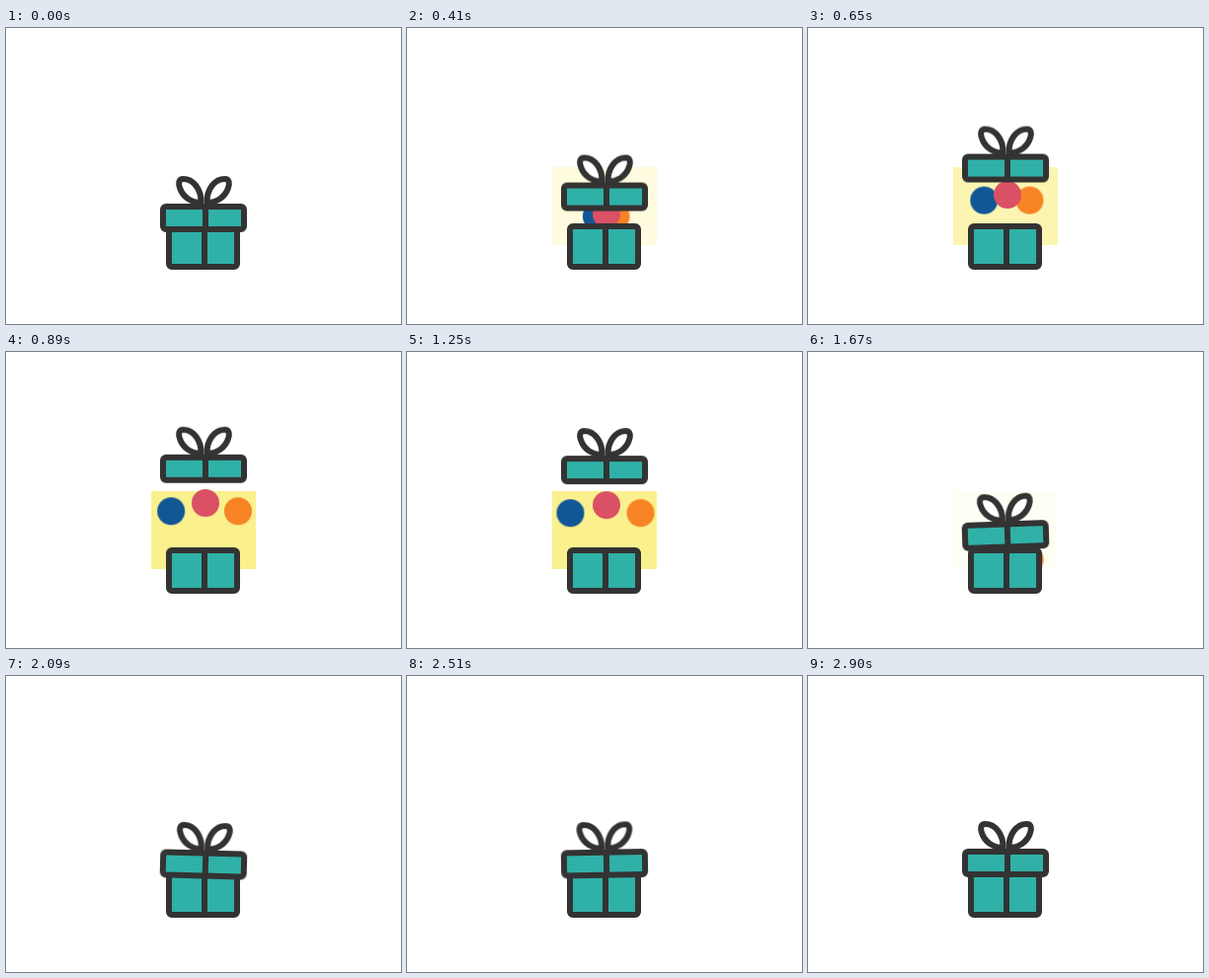
An HTML page without scripts that plays this animation: 400 px wide and 300 px high, repeating every 2990 ms.

```html
<!DOCTYPE html>
<html lang="en">
<head>
<meta charset="utf-8">
<title>Gift box</title>
<style>
  html, body {
    margin: 0;
    width: 100%;
    height: 100%;
    overflow: hidden;
    background: #fff;
  }
  svg { display: block; width: 100vw; height: 100vh; }

  .glow, .ball, .lid, .rock {
    animation: 2990ms linear infinite;
  }
  .glow { fill: #faef83; animation-name: glow; }
  .ball { animation-name: toss; }
  .lid { animation-name: lift; }
  .rock { animation-name: rock; transform-origin: 200px 192px; }

  .box { fill: #2fb1a8; }
  .bow { fill: #fff; }
  .line { stroke: #333; stroke-width: 6; stroke-linejoin: round; }

  /* --peak: highest point, --rest: place inside the box after the fall */
  .blue   { fill: #115796; --peak: -38px, -45.5px; --rest: -24px, 10px; }
  .orange { fill: #f78325; --peak: 36px, -45.5px;  --rest: 22px, 10px; }
  .red    { fill: #da5064; --peak: 0px, -54.5px;   --rest: 0px, 10px; }

  @keyframes glow {
    0%, 1.84% { opacity: 0; animation-timing-function: cubic-bezier(.37, 0, .63, 1); }
    36.29% { opacity: 1; }
    37.32% { opacity: 1; animation-timing-function: cubic-bezier(.37, 0, .63, 1); }
    60.1%, 100% { opacity: 0; }
  }
  @keyframes toss {
    0%, 1.84% { transform: translate(0, 0); animation-timing-function: cubic-bezier(.37, 0, .63, 1); }
    36.29% { transform: translate(var(--peak)); }
    37.32% { transform: translate(var(--peak)); animation-timing-function: cubic-bezier(.37, 0, .63, 1); }
    58.83% { transform: translate(var(--rest)); }
    60%, 100% { transform: translate(0, 10px); }
  }
  @keyframes lift {
    0%, 1.84% { transform: translateY(0); animation-timing-function: cubic-bezier(.37, 0, .63, 1); }
    36.29% { transform: translateY(-81px); }
    37.32% { transform: translateY(-81px); animation-timing-function: cubic-bezier(.37, 0, .63, 1); }
    58.83% { transform: translateY(-3px); }
    69.9% { transform: translateY(-1.5px); }
    97%, 100% { transform: translateY(-3px); }
  }
  @keyframes rock {
    0%, 52.2% { transform: rotate(0deg); animation-timing-function: ease-in-out; }
    55.85% { transform: rotate(-2deg); animation-timing-function: ease-in-out; }
    69.9% { transform: rotate(1.5deg); animation-timing-function: ease-in-out; }
    83.6% { transform: rotate(-1deg); animation-timing-function: ease-in-out; }
    97%, 100% { transform: rotate(0deg); }
  }
</style>
</head>
<body>
<svg viewBox="0 0 400 300">
  <rect class="glow" x="147" y="141" width="106" height="79"/>

  <circle class="ball blue" cx="202" cy="203" r="14"/>
  <circle class="ball orange" cx="202" cy="203" r="14"/>
  <circle class="ball red" cx="202" cy="203" r="14"/>

  <g class="line">
    <rect class="box" x="165" y="201" width="69" height="41" rx="3"/>
    <path d="M201 201V242"/>
  </g>

  <g class="lid">
    <g class="rock line">
      <path id="loop" class="bow" d="M197.500 177C198 164 190 153 179.500 153C174.500 153 174.500 158 176 162C179 171 187 177 197.500 177Z"/>
      <use href="#loop" transform="translate(401 0) scale(-1 1)"/>
      <rect class="box" x="159" y="181" width="82" height="23" rx="3"/>
      <path d="M202 181V204"/>
    </g>
  </g>
</svg>
</body>
</html>
```
